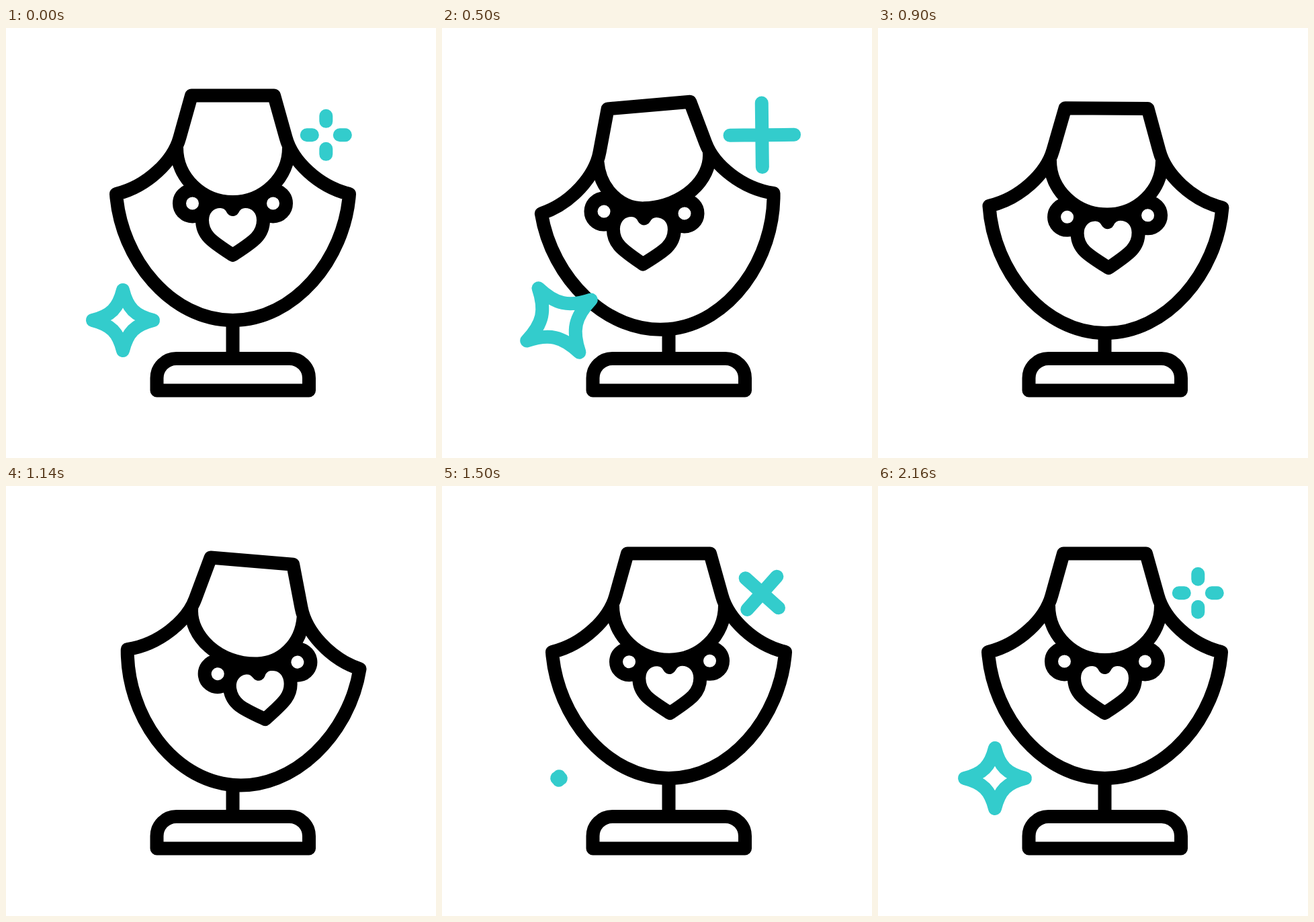
Recreate the animation shown at these times as an HTML page. Size 640x640 px, loop 2400 ms.

```html
<!DOCTYPE html>
<html>
<head>
<meta charset="utf-8">
<style>
html, body { margin: 0; width: 100%; height: 100%; overflow: hidden; background: #fff; }
svg { display: block; width: 100vw; height: 100vh; }
g { stroke-width: 20; stroke-linejoin: round; }
#ink { fill: #fff; stroke: #000; }
#glow { fill: none; stroke: #33cccc; stroke-linecap: round; }
</style>
</head>
<body>
<svg viewBox="0 0 640 640">
  <g id="ink">
    <path d="M337.5 435V492"/>
    <path d="M224.5 539.5V521A29 29 0 0 1 253.5 492H422A29 29 0 0 1 451 521V539.5Z"/>
    <g id="bust">
      <path d="M276 100.5H399L416.5 163C426 198 465 236 511 247C504 344 429 435 337.5 435C246 435 171 344 164 247C210 236 249 198 258.5 163Z"/>
      <path id="chain" fill="none"/>
      <g id="pendant">
        <path d="M337.5 270C333 261 326 258 319 258C303 258 292 270 292 286C292 309 307 318 337.5 338C368 318 383 309 383 286C383 270 372 258 356 258C349 258 342 261 337.5 270Z"/>
        <circle cx="277.5" cy="261" r="19.5"/>
        <circle cx="397.5" cy="261" r="19.5"/>
      </g>
    </g>
  </g>
  <g id="glow">
    <path id="star"/>
    <path id="cross"/>
  </g>
</svg>
<script>
const LOOP = 2400, MIDDLE = 1080, REST = 2160;
const $ = id => document.getElementById(id);
const rad = deg => deg * Math.PI / 180;
const clamp = x => Math.max(0, Math.min(1, x));

function ease(t, from, to) {
  const u = clamp((t - from) / (to - from));
  return u * u * (3 - 2 * u);
}

// The bust dips and leans left, then right; the pendant swings further
const drop = t => 20 * (ease(t, 0, 820) - ease(t, 820, 1460));
const tilt = t => -5 * ease(t, 0, 480) + 10 * ease(t, 700, 1080) - 5 * ease(t, 1100, 1440);
const swing = t => 12.5 * ease(t, 0, 300) - 26 * ease(t, 700, 1080) + 13.5 * ease(t, 1100, 1560);
const lag = t => -9 * (ease(t, 0, 300) - ease(t, 320, 800));

// The ends stay on the neck while the lowest point follows the pendant
function chainPath(angle, turn) {
  const left = 254, right = 421, top = 178, k = 0.55;
  const x = 337.5 - 94 * Math.sin(rad(angle));
  const y = 165 + 94 * Math.cos(rad(angle)) - Math.abs(angle) / 3;
  const bend = top + k * (y - top), slope = Math.tan(rad(turn));
  const a = k * (x - left), b = k * (right - x);
  return `M${left} ${top}C${left} ${bend} ${x - a} ${y - a * slope} ${x} ${y}`
    + `C${x + b} ${y + b * slope} ${right} ${bend} ${right} ${top}`;
}

// 0 at rest, 1 when a sparkle has vanished
const fade = (t, out, back) => clamp(t < MIDDLE ? t / out : (REST - t) / back);
const size = (rest, u) => (rest + 50 * u) * (1 - u ** 4);

function starPath(h) {
  const [a, b] = [0.15 * h, 0.4 * h];
  return `M0 ${-h}C${a} ${-b} ${b} ${-a} ${h} 0C${b} ${a} ${a} ${b} 0 ${h}`
    + `C${-a} ${b} ${-b} ${a} ${-h} 0C${-b} ${-a} ${-a} ${-b} 0 ${-h}Z`;
}

const crossPath = (a, b) =>
  `M0 ${-a}V${-b}M0 ${a}V${b}M${-a} 0H${-b}M${a} 0H${b}`;

function sparkle(id, x, y, turn, path) {
  $(id).setAttribute("d", path);
  $(id).setAttribute("transform", `translate(${x} ${y}) rotate(${turn})`);
}

function draw(t) {
  const sw = swing(t), lg = lag(t);
  $("bust").setAttribute("transform", `translate(0 ${drop(t)}) rotate(${tilt(t)} 337.5 440)`);
  $("chain").setAttribute("d", chainPath(sw, (sw + lg) / 2));
  $("pendant").setAttribute("transform", `rotate(${sw} 337.5 165) rotate(${lg} 337.5 261)`);

  const s = fade(t, 670, 664);
  sparkle("star", 174, 435, -90 * s ** 3.5, s < 1 ? starPath(size(45, s)) : "");

  const c = fade(t, 706, 770), spin = t < MIDDLE ? -180 : 180;
  sparkle("cross", 476.3, 159.3, spin * c * c,
    c < 1 ? crossPath(20.5 * (1 - c), size(28.5, c)) : "");
}

const start = performance.now();
function frame() {
  draw((performance.now() - start) % LOOP);
  requestAnimationFrame(frame);
}
frame();
</script>
</body>
</html>
```
